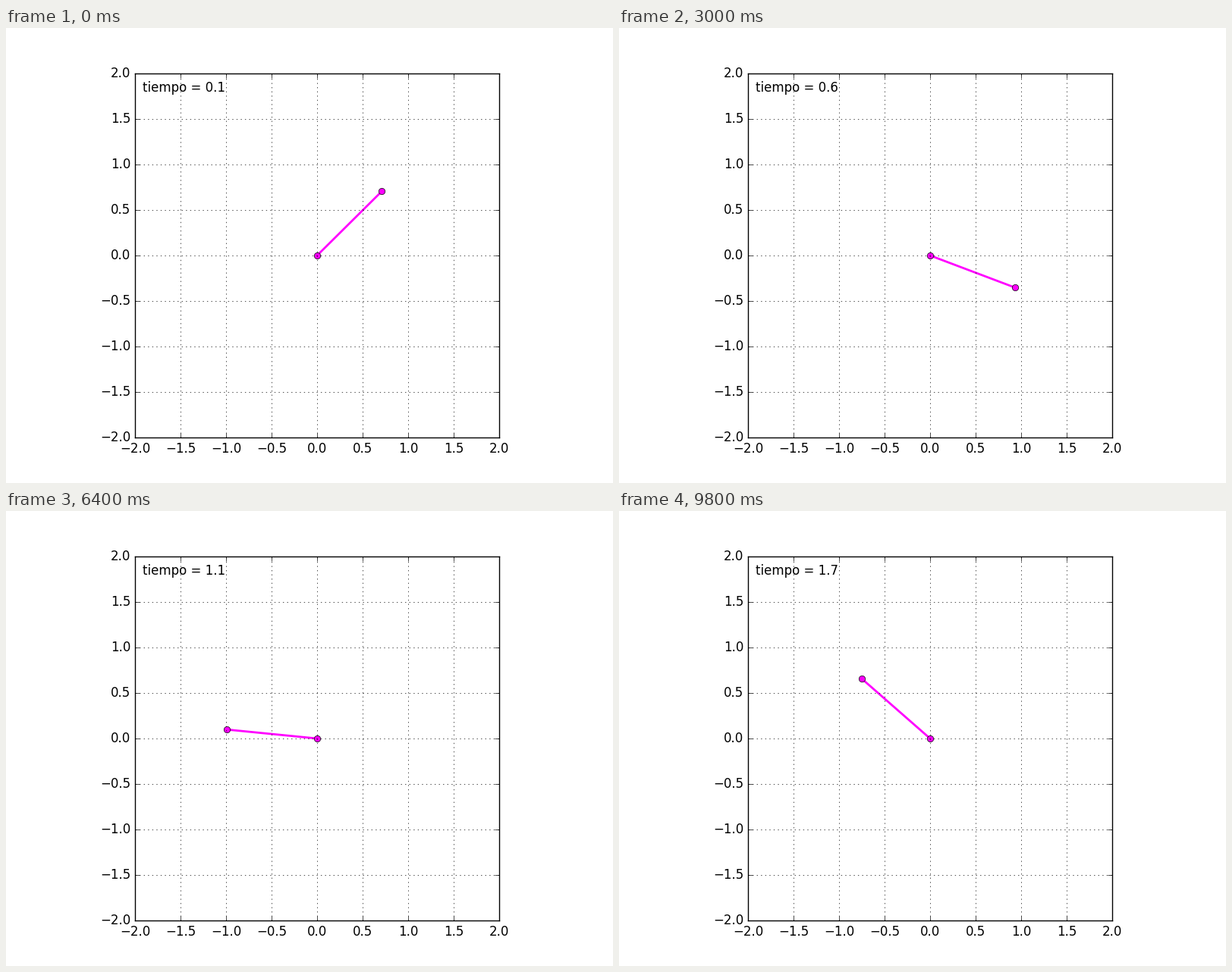
Write a matplotlib script that moves like this. It is 800 px wide and 600 px high and loops after 10 s.

```python
import numpy as np
import matplotlib.pyplot as plt
from matplotlib.animation import FuncAnimation

plt.style.use("classic")
plt.rcParams.update({
    "font.family": "DejaVu Sans",
    "figure.dpi": 100,
    "savefig.dpi": 100,
    "figure.facecolor": "white",
})

FRAMES, INTERVAL = 50, 200
DT = 1 / 30        # simulated seconds per frame
SUBSTEPS = 20
LEAD = 2           # simulation steps taken before the first frame
G, LENGTH = 9.8, 1.0


def slope(state):
    theta, omega = state
    return np.array([omega, -G / LENGTH * np.sin(theta)])


def rk4(state, h):
    a = slope(state)
    b = slope(state + a * h / 2)
    c = slope(state + b * h / 2)
    d = slope(state + c * h)
    return state + h * (a + 2 * b + 2 * c + d) / 6


def swing(steps):
    """Pendulum angle, measured from straight down, after each step."""
    state = np.radians([135.0, 10.0])
    angles = [state[0]]
    for _ in range(steps):
        for _ in range(SUBSTEPS):
            state = rk4(state, DT / SUBSTEPS)
        angles.append(state[0])
    return angles


angles = swing(FRAMES + LEAD)

fig = plt.figure(figsize=(8, 6), dpi=100, facecolor="white")
ax = fig.add_subplot(111, aspect="equal", autoscale_on=False,
                     xlim=(-2, 2), ylim=(-2, 2))
ticks = np.linspace(-2, 2, 9)
ax.set_xticks(ticks)
ax.set_yticks(ticks)
ax.grid(True)

rod, = ax.plot([], [], "o-", color="magenta", lw=2, markersize=6,
               markeredgecolor="black", markeredgewidth=0.5)
clock = ax.text(0.02, 0.95, "", transform=ax.transAxes)


def update(i):
    step = i + LEAD
    theta = angles[step]
    rod.set_data([0, LENGTH * np.sin(theta)], [0, -LENGTH * np.cos(theta)])
    clock.set_text(f"tiempo = {step * DT:.1f}")
    return rod, clock


anim = FuncAnimation(fig, update, frames=FRAMES, interval=INTERVAL,
                     init_func=lambda: update(0), repeat=True,
                     repeat_delay=0, blit=False)
plt.show()
```
